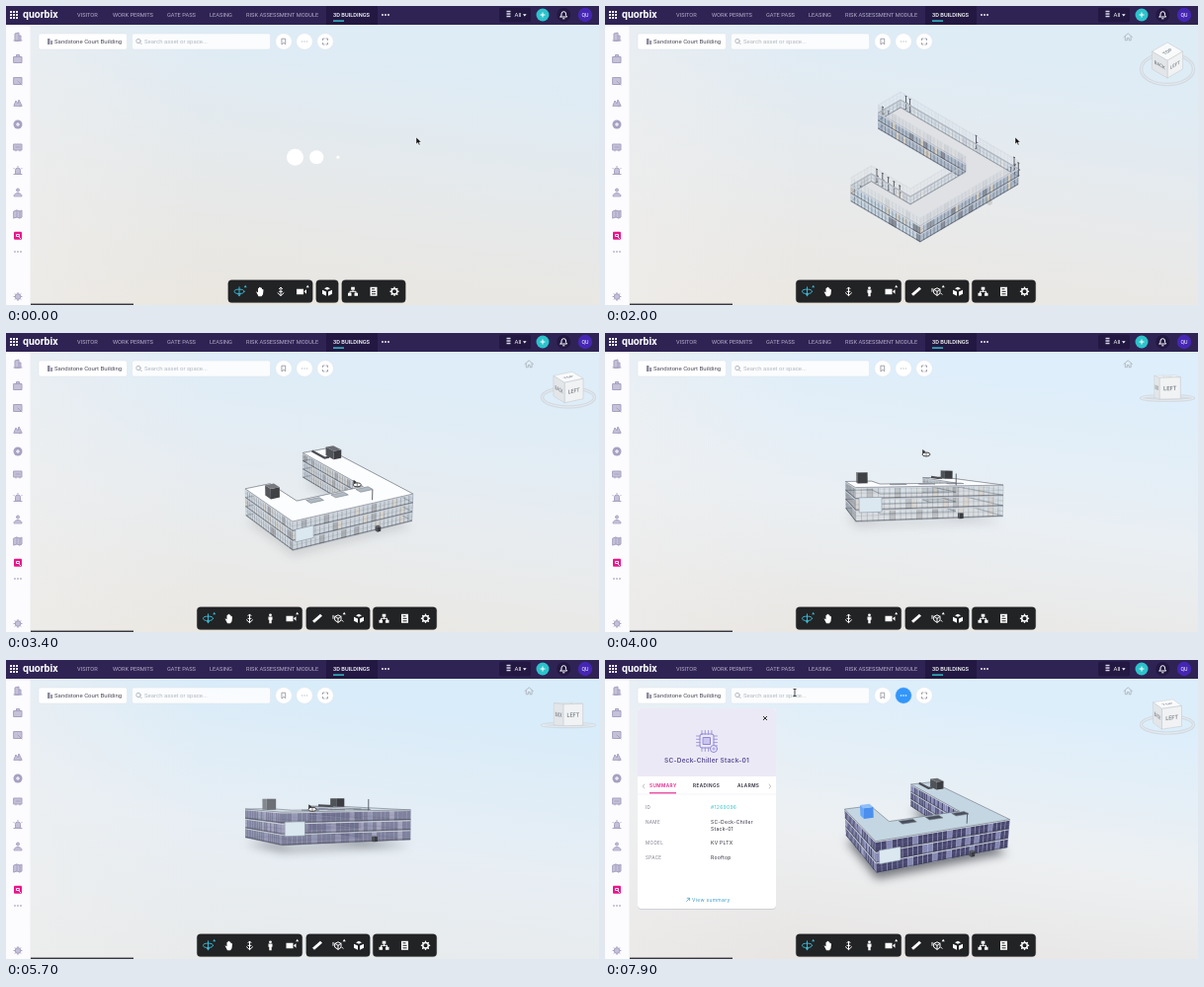
An HTML page with a canvas that plays this animation: 600x303 px, repeating every 8 s.

```html
<!DOCTYPE html>
<html lang="en">
<head>
<meta charset="utf-8">
<title>Building viewer</title>
<style>
html, body { margin: 0; width: 100%; height: 100%; overflow: hidden; background: #e6eaec; }
canvas, svg { position: absolute; left: 0; top: 0; width: 600px; height: 303px; }
text { font-family: Roboto, "Open Sans", sans-serif; }
#panel text { font-family: Inter, Roboto, sans-serif; font-size: 5px; letter-spacing: .3px; }
.line { fill: none; stroke: currentColor; stroke-width: 1; stroke-linecap: round; stroke-linejoin: round; }
</style>
</head>
<body>
<canvas id="scene" width="600" height="303"></canvas>
<svg id="ui" viewBox="0 0 600 303">
  <rect y="19" width="24.5" height="284" fill="#fcfbfe"/>
  <g id="side" color="#a7a1c2"></g>
  <rect x="25" y="301.6" width="104" height="1.4" fill="#34343a"/>

  <rect width="600" height="19" fill="#2f2354"/>
  <rect x="324" width="52" height="19" fill="#221842"/>
  <g id="grid" fill="#fff"></g>
  <text x="17" y="12.3" font-size="10.5" font-weight="700" fill="#fff">quorbix</text>
  <g id="nav" font-size="5.7"></g>
  <rect x="331" y="14.4" width="11" height="1.4" fill="#35c7d0"/>
  <g fill="#fff"><circle cx="381" cy="9" r=".9"/><circle cx="384" cy="9" r=".9"/><circle cx="387" cy="9" r=".9"/></g>
  <rect x="499" y="1.5" width="32" height="15" rx="2" fill="#221842"/>
  <path d="M506.5 5.5h4M506.5 8h4M506.5 10.5h4" stroke="#d8d4e6" stroke-width="1.5"/>
  <text x="514.5" y="11" font-size="6" fill="#fff">All</text>
  <path d="M523 8.3h3.600l-1.800 2.200z" fill="#fff"/>
  <circle cx="543" cy="9" r="6.5" fill="#2cc3cb"/>
  <path d="M540.5 9h5M543 6.5v5" stroke="#fff"/>
  <circle cx="564.3" cy="9" r="7" fill="#221842"/>
  <path class="line" color="#fff" d="M561 11h6.600l-1-1.500V8a2.300 2.300 0 0 0-4.600 0v1.500zM563.6 12.8h1.400" stroke-width=".8"/>
  <circle cx="586" cy="9" r="7.2" fill="#4526b4"/>
  <text x="586" y="11" font-size="5.3" text-anchor="middle" fill="#fff">QU</text>

  <g fill="#fff" stroke="#dfe3ea" stroke-width=".5">
    <rect x="33" y="28" width="89.5" height="16" rx="2"/>
    <rect x="127.5" y="28" width="140" height="16" rx="2" fill-opacity=".85"/>
    <circle cx="281" cy="36" r="8.3"/><circle id="more" cx="302" cy="36" r="8.3"/><circle cx="323" cy="36" r="8.3"/>
  </g>
  <path d="M42 39v-6h2.500v6zM45.3 39v-4h1.700v4z" fill="#8d8a9c"/>
  <text x="49" y="38.2" font-size="6.05" fill="#4c4a58">Sandstone Court Building</text>
  <g class="line" color="#b6bbc3" stroke-width=".7"><circle cx="134" cy="35.5" r="2.2"/><path d="M135.7 37.2l1.500 1.500"/></g>
  <text x="140" y="38.2" font-size="6" fill="#b4b8c0">Search asset or space...</text>
  <path class="line" color="#7d7d8a" d="M279.3 33.200h3.400v5.600l-1.700-1.500-1.700 1.500z" style="stroke-width:.7"/>
  <g id="moreDots"><circle cx="299.5" cy="36" r=".8"/><circle cx="302" cy="36" r=".8"/><circle cx="304.5" cy="36" r=".8"/></g>
  <path class="line" color="#7d7d8a" d="M320.5 34.500v-1.500h1.500M324 33h1.500v1.500M325.5 37.500v1.500h-1.500M322 39h-1.500v-1.500" style="stroke-width:.7"/>
  <path id="home" class="line" color="#a8afb6" d="M525 31.500l4.200-3.700 4.200 3.700M526.3 31v3.800h2v-2.300h1.800v2.300h2V31" style="stroke-width:.8"/>

  <g id="barA"></g>
  <g id="barB"></g>

  <g id="panel">
    <rect x="33" y="50" width="140" height="203" rx="4" fill="#55617a" opacity=".18"/>
    <rect x="33" y="49" width="140" height="203" rx="4" fill="#fff"/>
    <path d="M33 118V53a4 4 0 0 1 4-4h132a4 4 0 0 1 4 4v65z" fill="#ece9f6"/>
    <path d="M160 57l4 4M164 57l-4 4" stroke="#333" stroke-width="1"/>
    <g id="chip" class="line" color="#8d86d8"></g>
    <text x="103" y="104.3" style="font-size:6.5px;letter-spacing:.25px" font-weight="600" text-anchor="middle" fill="#5b4f96">SC-Deck-Chiller Stack-01</text>
    <g id="fields"></g>
    <path d="M45 134.200h27v1.300H45z" fill="#e5268c"/>
    <path d="M33 136h140" stroke="#ece9f2" stroke-width=".6"/>
    <path class="line" color="#999" d="M39.8 126l-1.500 2 1.500 2M166.2 126l1.500 2-1.500 2" style="stroke-width:.6"/>
    <path class="line" color="#3a9cc4" d="M82.5 244.500l3-3M83.2 241.300h2.400v2.400" style="stroke-width:.7"/>
  </g>

  <g id="cursor">
    <path id="arrow" d="M0 0v7l1.700-1.500 1.200 2.600 1.200-.6-1.200-2.500h2.300z" fill="#111" stroke="#fff" stroke-width=".5"/>
    <g id="orbit"><ellipse cy="1" rx="4" ry="2" fill="#fff" stroke="#333" stroke-width=".9"/><path d="M-3.500-3.500l2.500 1.800-2.500 1.500zM0-1v4" fill="#333" stroke="#333" stroke-width=".6"/></g>
    <path id="beam" d="M-1.500-3.500h3M0-3.500v7M-1.500 3.500h3" stroke="#222" stroke-width=".8"/>
  </g>
</svg>
<script>
const $ = id => document.getElementById(id);
const ctx = $('scene').getContext('2d');
const LOOP = 8000;

// ---------- static interface ----------
const text = (x, y, s, fill, more = '') => `<text x="${x}" y="${y}" fill="${fill}" ${more}>${s}</text>`;

$('grid').innerHTML = [0, 1, 2].map(r => [0, 1, 2].map(c =>
  `<rect x="${4 + c * 3}" y="${5 + r * 3}" width="2" height="2"/>`).join('')).join('');

$('nav').innerHTML = [[72, 'VISITOR'], [108, 'WORK PERMITS'], [163, 'GATE PASS'], [206, 'LEASING'],
  [243, 'RISK ASSESSMENT MODULE'], [331, '3D BUILDINGS']]
  .map(([x, s], i) => text(x, 11, s, i == 5 ? '#fff' : '#b3adc8', i == 5 ? 'font-weight="500"' : '')).join('');

const sideIcons = [
  [31, 'M-3 4V-3L1-4V4zM1-1H3V4H1M-4 4H4'],
  [53.5, 'M-4-2H4V4H-4zM-1.500-2V-4H1.500V-2'],
  [76, 'M-4-3.500H4V3.500H-4zM0 0L4 4'],
  [98, 'M-4 3L-2-2 0 1 1-3 4 3zM2 3V4'],
  [143, 'M-4-3H4V3H-4zM-2 3V4M2 3V4M-2 0H2'],
  [166.5, 'M-2.500 3V0A2.500 2.500 0 0 1 2.500 0V3zM-4 4H4M0-4V-3.500M-4-2L-3.500-1.500M4-2L3.500-1.500'],
  [188.5, 'M-1.500-2A1.500 1.500 0 1 1 1.500-2A1.500 1.500 0 1 1-1.500-2M-4 4C-4 0 4 0 4 4z'],
  [211, 'M-4-3L-1-4V3L-4 4zM-1-4L2-3V4L-1 3M2-3L4-4V3L2 4']
];
const gear = 'M-2.800 0A2.800 2.800 0 1 1 2.800 0A2.800 2.800 0 1 1-2.800 0M0-4V-3M0 3V4M-4 0H-3M3 0H4M-2.800-2.800L-2-2M2 2L2.800 2.800M-2.800 2.800L-2 2M2-2L2.800-2.800';
const dot = (x, y, r, c) => `<circle cx="${x}" cy="${y}" r="${r}" fill="${c}"/>`;
$('side').innerHTML = [...sideIcons, [294.5, gear]].map(([y, d]) =>
  `<path class="line" transform="translate(12 ${y})" d="${d}" style="fill:currentColor;fill-opacity:.65"/>`).join('')
  + dot(12, 120, 4.5, '#a7a1c2') + '<path d="M10 120h4M12 118v4" stroke="#fff"/>'
  + '<rect x="8" y="228.8" width="8" height="8" rx="1" fill="#e6168a"/><path d="M10.5 231.500h3v2h-3zM13 234l2 2" stroke="#fff" stroke-width=".9" fill="none"/>'
  + [9, 12, 15].map(x => dot(x, 249, .8, '#8f88ad')).join('');

const tools = {
  orbit: '<g color="#39b4cf" class="line"><ellipse rx="5" ry="2.2"/><path d="M0-4.500V4.500M-1 3L0 4.500 1 3"/></g>',
  hand: '<path d="M-4 0L-2 1V-3Q-1.500-4-1-3V-4Q0-5 .6-4V-3.500Q1.500-4.500 2-3V-2Q3-3 3.500-1.500L3 3 1.500 5H-1.500z" fill="#fff"/>',
  pan: '<path class="line" d="M0-4V4M-1.500-2.700L0-4.300 1.500-2.700M-3 1.500L0 4.300 3 1.500M-1.500 0H1.500"/>',
  person: '<circle cy="-3.5" r="1.4" fill="#fff"/><path d="M-2-1.700H2V1.500H1.200V5H-1.200V1.500H-2z" fill="#fff"/>',
  camera: '<path d="M-5-2.500H2V3H-5zM2.500 0L5-2V2.500z" fill="#fff"/>',
  ruler: '<path d="M-5 2.500L3-4.500 5-2.500-3 4.500z" fill="#fff"/>',
  burst: '<path class="line" d="M-3-2L0-3.500 3-2V2L0 4-3 2zM-3-2L0 0 3-2M0 0V4M-5-3V0M4 2L5 3"/>',
  cube: '<path d="M0-4.500L3-3 0-1.500-3-3zM-5-1.500L-1 .3V4.500L-5 2.500zM5-1.500L1 .3V4.500L5 2.500z" fill="#fff"/>',
  tree: '<path d="M-1.800-4.500H1.800V-1.500H-1.800zM-5 1.500H-1.500V4.500H-5zM1.500 1.500H5V4.500H1.500z" fill="#fff"/><path class="line" d="M0-1V0M-3 1.500V0H3V1.500" stroke-width=".8"/>',
  sheet: '<path d="M-3.500-4.500H3.500V4.500H-3.500z" fill="#fff"/><path d="M-2-2.500H1M-2 0H2M-2 2.500H2" stroke="#222"/>',
  gear: `<path class="line" d="${gear}" style="stroke-width:1.5"/>`
};
const flagged = ['orbit', 'camera', 'burst'];
function toolbar(groups) {
  return groups.map(([left, names]) => {
    const list = names.split(' ');
    return `<rect x="${left - .7}" y="277.7" width="${list.length * 21 + 1.4}" height="22.9" rx="3.5" fill="#222325" stroke="#222325" stroke-opacity=".3"/>` + list.map((n, i) =>
      `<g color="#fff" transform="translate(${left + 10.5 + i * 21} 289.3)">${tools[n]}${
        flagged.includes(n) ? `<path d="M4.7-4L6.2-6.500 7.7-4z" fill="${n == 'orbit' ? '#39b4cf' : '#fff'}"/>` : ''}</g>`).join('');
  }).join('');
}
$('barA').innerHTML = toolbar([[225.5, 'orbit hand pan camera'], [314.5, 'cube'], [340.5, 'tree sheet gear']]);
$('barB').innerHTML = toolbar([[194, 'orbit hand pan person camera'], [304.5, 'ruler burst cube'], [372, 'tree sheet gear']]);

$('chip').innerHTML = '<rect x="96" y="75" width="14" height="14" rx="2"/><rect x="99.5" y="78.5" width="7" height="7" fill="#c9c4f0"/>'
  + [0, 1, 2, 3].map(i => {
    const a = 98 + i * 3.3, b = a - 21;
    return `<path d="M${a} 75V71.500M${a} 89V92.500M96 ${b}H92.500M110 ${b}H113.500" stroke-width=".8"/>`;
  }).join('') + '<circle cx="110" cy="90" r="3.5" fill="#f1effa"/><path d="M108.5 90h3M110 88.500v3" stroke-width=".7"/>';

const dark = '#2e2b3a', grey = '#817d8e';
const tab = 'font-weight="600" style="font-size:4.7px;letter-spacing:.4px"';
$('fields').innerHTML = text(45, 129.3, 'SUMMARY', '#e5268c', tab) + text(89, 129.3, 'READINGS', dark, tab)
  + text(134, 129.3, 'ALARMS', dark, tab)
  + [['ID', 151], ['NAME', 166], ['MODEL', 187], ['SPACE', 202]].map(([s, y]) => text(41, y, s, grey, 'style="font-size:4.7px"')).join('')
  + [['SC-Deck-Chiller', 166], ['Stack-01', 172.8], ['KV PLTX', 187], ['Rooftop', 202]].map(([s, y]) => text(107, y, s, dark)).join('')
  + text(107, 151, '#1269096', '#35c3c9') + text(88, 244.5, 'View summary', '#3a9cc4');

// ---------- timing ----------
const ramp = (t, a, b) => { const k = Math.min(1, Math.max(0, (t - a) / (b - a))); return k * k * (3 - 2 * k); };
function at(rows, t) {
  let i = 0;
  while (i < rows.length - 2 && t >= rows[i + 1][0]) i++;
  const [a, b] = [rows[i], rows[i + 1]], k = ramp(t, a[0], b[0]);
  return a.slice(1).map((v, j) => v + (b[j + 1] - v) * k);
}
const rgb = (c, a = 1) => `rgba(${c.map(Math.round)},${a})`;
const mix = (a, b, k) => a.map((v, i) => v + (b[i] - v) * k);
const rad = d => d * Math.PI / 180;

// time, yaw, pitch, perspective strength, centre y
const view = [[0, 45, 36, 0, 163], [2850, 45, 36, 0, 163], [4000, 14, 5, 1, 164],
  [5200, 27, -9, .5, 168], [6300, 24, 19, 1, 160], [8000, 24, 19, 1, 160]];
const pointer = [[0, 415, 133], [2200, 415, 133], [2750, 382, 180], [2850, 382, 180], [4000, 325, 122],
  [5200, 339, 146], [6300, 272, 156], [6950, 272, 156], [7600, 192, 33], [8000, 192, 33]];
// time, then top, middle and bottom colours
const sky = [
  [0, 222, 236, 246, 230, 233, 234, 234, 230, 223], [2850, 222, 236, 246, 231, 234, 236, 235, 231, 225],
  [4000, 222, 238, 250, 234, 239, 243, 233, 230, 226], [5200, 214, 234, 248, 226, 237, 245, 233, 238, 240],
  [6300, 221, 238, 251, 237, 240, 242, 231, 228, 226], [8000, 221, 238, 251, 237, 240, 242, 231, 228, 226]
];

// ---------- model ----------
const plan = [[0, 0], [99, 0], [99, 29], [43, 29], [43, 108], [168, 108], [168, 140], [0, 140]];
// x, y, step x, step y, count
const posts = [[281, 102, 5.7, 4, 4], [304.5, 91, 4, 3, 2], [321, 126, 5, 3, 2], [355, 145, 5.5, 4, 2], [375.5, 131, 0, 0, 1],
  [258.5, 182, 3.9, 2.6, 4], [275, 165, 5.8, 4.2, 5], [292.5, 201, 3.6, 2.8, 3], [376.5, 184, 3.8, -2.3, 12], [414, 153, 0, 0, 1]];
let sinY, cosY, sinP, cosP, lens, centreY;
const project = (x, y, z) => [y * cosY - x * sinY, -(y * sinY + x * cosY) * sinP - z * cosP];
function P(x, y, z) {
  x -= 84; y -= 70; z -= 15;
  const [a, b] = project(x, y, z);
  const depth = (y * sinY + x * cosY) * cosP - z * sinP;
  const scale = (1 - .09 * lens) / (1 + lens * depth / 450);
  return [309 + a * scale, centreY + b * scale];
}

function poly(pts, fill, stroke, width = .6) {
  ctx.beginPath();
  pts.forEach(p => ctx.lineTo(...P(...p)));
  if (fill) { ctx.closePath(); ctx.fillStyle = fill; ctx.fill(); }
  if (stroke) { ctx.strokeStyle = stroke; ctx.lineWidth = width; ctx.stroke(); }
}
const slab = (z, fill, stroke) => poly([...plan, plan[0]].map(([x, y]) => [x, y, z]), fill, stroke);
function box(x0, x1, y0, y1, z0, z1, [top, front, side]) {
  poly([[x0, y0, z0], [x1, y0, z0], [x1, y0, z1], [x0, y0, z1]], side);
  poly([[x0, y0, z0], [x0, y1, z0], [x0, y1, z1], [x0, y0, z1]], front);
  if (sinP > 0) poly([[x0, y0, z1], [x1, y0, z1], [x1, y1, z1], [x0, y1, z1]], top);
}
const noise = n => { const s = Math.sin(n * 127.1) * 43758.5; return s - Math.floor(s); };
function edge(i) {
  const [ax, ay] = plan[i], [bx, by] = plan[(i + 1) % plan.length], dx = bx - ax, dy = by - ay;
  return { ax, ay, dx, dy, facing: dy * cosY - dx * sinY < 0 };
}

// airy: how far the glass has turned clear; solid: how far it has turned dark
function wall(i, z, airy, solid) {
  const { ax, ay, dx, dy, facing } = edge(i), n = Math.round(Math.hypot(dx, dy) / 5);
  if (!facing && solid > .6) return;
  const point = (k, h) => [ax + dx * k, ay + dy * k, z + h];
  const band = (h, color, width) => poly([point(0, h), point(1, h)], null, color, width);
  const clear = .6 - .25 * airy;
  for (let j = 0; j < n; j++) {
    const r = noise(i * 57 + z * 3 + j + 1);
    const glass = r < .18 ? [206, 196, 176] : r < .32 ? mix([84, 92, 108], [130, 132, 134], airy)
      : mix(i == 0 ? [186, 210, 226] : [146, 166, 190], [206, 214, 220], airy);
    const tint = r < .3 ? [134, 136, 180] : [72, 70, 110];
    poly([point(j / n, 0), point((j + 1) / n, 0), point((j + 1) / n, 10), point(j / n, 10)],
      rgb(mix(glass, tint, solid), facing ? clear + (1 - clear) * solid : .2));
    poly([point(j / n, 0), point(j / n, 10)], null, rgb(mix([66, 74, 90], [176, 184, 214], solid),
      (facing ? .8 : .4) * (1 - .5 * airy * (1 - solid))), .5);
  }
  band(5, rgb(mix([120, 128, 140], [130, 132, 172], solid), .5), .4);
  band(.6, `rgba(60,64,76,${facing ? .75 : .4})`, .7);
  band(9.6, facing ? '#d2d7df' : '#b4bac4', 1.5);
}

function building(t) {
  const solid = ramp(t, 5300, 5900), airy = ramp(t, 2850, 3800), roofOn = ramp(t, 2200, 2450), above = sinP > 0;
  const picked = t > 6850;
  if (above && t > 2850) {
    ctx.save();
    ctx.filter = 'blur(5px)';
    ctx.globalAlpha = .15 + .55 * solid;
    ctx.translate(0, 4);
    slab(-2, '#44464e');
    ctx.restore();
  }
  const roof = () => {
    ctx.globalAlpha = roofOn;
    slab(30, rgb(mix([252, 253, 254], [196, 214, 226], solid)), '#6d7480');
    if (above) {
      for (const y of [38, 67, 97])
        poly([[31, y, 30], [40, y, 30], [40, y + 15, 30], [31, y + 15, 30]], rgb(mix([176, 186, 194], [72, 78, 92], solid)), '#777f88');
      poly([[166, 119, 31], [138, 119, 31], [138, 125, 31]], null, '#4a4d54', 2.2);
    }
  };
  const plant = () => {
    ctx.globalAlpha = roofOn;
    box(130, 147, 126, 136, 30, 40, ['#6a6d73', '#3b3d42', '#505358']);
    box(60, 72, 9, 19, 30, 41, picked ? ['#8fc0fa', '#4a8fee', '#68a6f6']
      : solid > .5 ? ['#a9adb2', '#6c7076', '#84888e'] : ['#77797e', '#404246', '#54565b']);
    poly([[7, 95, 30], [7, 95, 41]], null, '#50555e', .9);
  };
  const level = z => {
    for (const front of [false, true])
      for (const i of [5, 4, 3, 2, 6, 1, 0, 7])
        if (edge(i).facing == front) wall(i, z, airy, solid);
  };
  const wallsOn = [0, 10, 20].map(z => ramp(t, 1550 + z * 20, 1750 + z * 20));
  if (above) {
    [0, 10, 20].forEach((z, k) => {
      ctx.globalAlpha = wallsOn[k];
      slab(z, '#dfe1e4', '#8e959e');
      level(z);
    });
    roof();
    plant();
  } else {
    plant();
    roof();
    for (const z of [20, 10, 0]) {
      ctx.globalAlpha = 1;
      level(z);
      slab(z, z ? 'rgba(196,198,200,.85)' : '#cbc9c5', '#8f9092');
      // facades stay in front of the upper slabs
      if (z) [0, 7].forEach(i => wall(i, z, airy, solid));
    }
  }
  ctx.globalAlpha = wallsOn[2];
  poly([[0, 3, 8], [0, 23, 8], [0, 23, 21], [0, 3, 21]], '#dbe8f0', '#8b97a4');
  box(-5, -1, 94, 98, 0, 5, ['#55585e', '#3a3c42', '#4b4d54']);
  ctx.globalAlpha = 1;
}

function loadingPosts(t) {
  ctx.strokeStyle = '#4c4f55';
  ctx.lineWidth = .9;
  posts.forEach(([x, y, dx, dy, n], g) => {
    if (t < 850 + g * 40) return;
    for (let i = 0; i < n; i++) {
      const px = x + dx * i, py = y + dy * i;
      ctx.beginPath();
      ctx.moveTo(px - 1, py); ctx.lineTo(px + 1, py + .7);
      ctx.moveTo(px, py); ctx.lineTo(px, py + 14);
      ctx.moveTo(px, py + 7); ctx.lineTo(px + 1.8, py + 7.5);
      ctx.moveTo(px - 1.5, py + 14); ctx.lineTo(px + 1, py + 13);
      ctx.stroke();
    }
  });
}

function viewCube() {
  const cx = 569, cy = 55, h = 11;
  ctx.lineWidth = 3.5;
  ctx.strokeStyle = 'rgba(200,205,210,.55)';
  ctx.beginPath();
  ctx.ellipse(cx, cy + h * cosP, 26.5, Math.max(1, 26.5 * Math.abs(sinP)), 0, 0, 7);
  ctx.stroke();
  ctx.lineWidth = .6;
  ctx.strokeStyle = '#f6f7f8';
  ctx.stroke();
  const face = (o, u, v, label, fill) => {
    const [ux, uy] = project(...u), [vx, vy] = project(...v), [ox, oy] = project(...o);
    if (ux * vy - uy * vx <= 0) return;
    ctx.save();
    ctx.transform(ux, uy, vx, vy, cx + ox, cy + oy);
    ctx.fillStyle = fill;
    ctx.strokeStyle = '#c3c8cc';
    ctx.lineWidth = .6;
    ctx.fillRect(-h, -h, 2 * h, 2 * h);
    ctx.strokeRect(-h, -h, 2 * h, 2 * h);
    ctx.fillStyle = '#777d84';
    ctx.font = '500 6px Roboto, sans-serif';
    ctx.textAlign = 'center';
    ctx.fillText(label, 0, 2.2);
    ctx.restore();
  };
  face([0, 0, h], [0, 1, 0], [-1, 0, 0], 'TOP', '#f9fafb');
  face([0, 0, -h], [0, 1, 0], [1, 0, 0], 'BOTTOM', '#d5d9dc');
  face([-h, 0, 0], [0, 1, 0], [0, 0, -1], 'LEFT', '#f0f2f3');
  face([0, -h, 0], [-1, 0, 0], [0, 0, -1], 'BACK', '#e3e6e9');
}

const show = (id, on) => $(id).style.display = on ? '' : 'none';

function draw(now) {
  const t = now % LOOP, ready = t >= 600;
  let yaw, pitch;
  [yaw, pitch, lens, centreY] = at(view, t);
  [sinY, cosY, sinP, cosP] = [Math.sin(rad(yaw)), Math.cos(rad(yaw)), Math.sin(rad(pitch)), Math.cos(rad(pitch))];

  const c = at(sky, t), back = ctx.createLinearGradient(200, 19, 160, 303);
  [0, .5, 1].forEach((s, i) => back.addColorStop(s, rgb(c.slice(i * 3, i * 3 + 3))));
  ctx.fillStyle = back;
  ctx.fillRect(0, 0, 600, 303);
  const glow = ctx.createLinearGradient(24, 0, 200, 0);
  glow.addColorStop(0, 'rgba(240,240,240,.5)');
  glow.addColorStop(1, 'rgba(240,240,240,0)');
  ctx.fillStyle = glow;
  ctx.fillRect(24, 19, 180, 284);

  if (t < 800) {
    ctx.fillStyle = '#fff';
    for (let i = 0; i < 3; i++) {
      const s = Math.sin(Math.PI * (t / 1400 + .5 - .09 * i - .045 * i * i));
      ctx.beginPath();
      ctx.arc(292.5 + i * 21.7, 153.3, 8.5 * s * s, 0, 7);
      ctx.fill();
    }
  }
  if (t < 2300) loadingPosts(t);
  if (t > 1500) building(t);
  if (ready) viewCube();

  show('home', ready);
  show('barA', !ready);
  show('barB', ready);

  const open = ramp(t, 7000, 7250);
  show('panel', open > 0);
  $('panel').setAttribute('opacity', open);
  $('more').setAttribute('fill', t >= 7000 ? '#3296fb' : '#fff');
  $('moreDots').setAttribute('fill', t >= 7000 ? '#fff' : '#c8ccd2');

  const [px, py] = at(pointer, t);
  $('cursor').setAttribute('transform', `translate(${px} ${py})`);
  const dragging = t >= 2750 && t < 6600, typing = t >= 7500;
  show('arrow', !dragging && !typing);
  show('orbit', dragging);
  show('beam', typing);
}

const start = performance.now();
function tick() {
  draw(performance.now() - start);
  requestAnimationFrame(tick);
}
tick();
</script>
</body>
</html>
```
